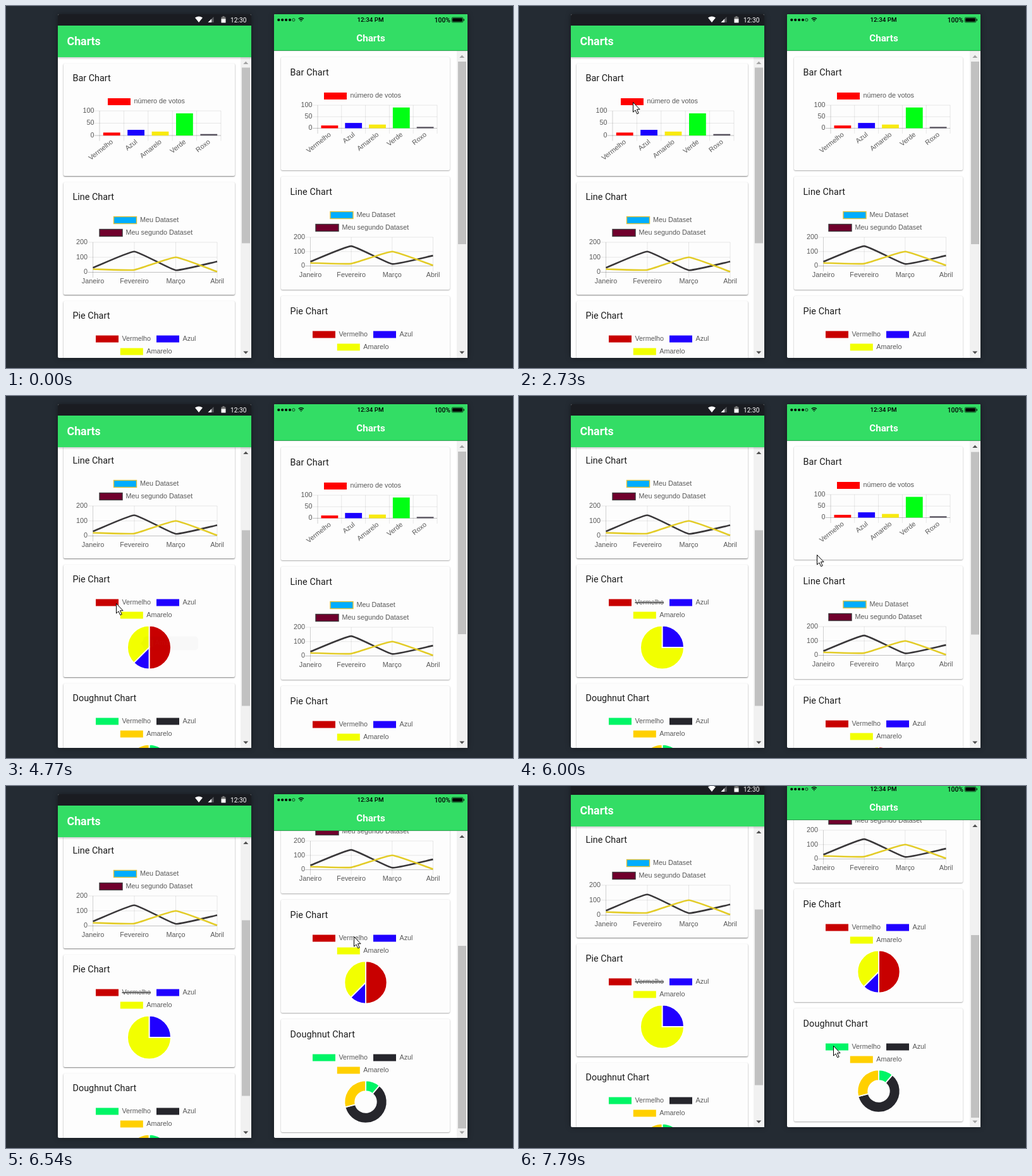
Write an HTML page with a canvas that moves like this. It is 802 px wide and 573 px high and loops after 8 s.

```html
<!DOCTYPE html>
<html lang="pt">
<head>
<meta charset="utf-8">
<title>Charts</title>
<style>
html, body { margin: 0; width: 100%; height: 100%; overflow: hidden; background: #242b33; }
canvas { display: block; }
</style>
</head>
<body>
<canvas id="stage" width="802" height="573"></canvas>
<script>
const g = document.getElementById('stage').getContext('2d');
const SANS = '"Liberation Sans", Arial, sans-serif', ROBOTO = 'Roboto, sans-serif';
const TAU = Math.PI * 2, LOOP = 8000;
const clamp = v => Math.max(0, Math.min(1, v));
const lerp = (a, b, u) => a + (b - a) * u;

// Number of steps (0..n) taken of a move that shows its first step at t0 and its last at t1.
const steps = (t, t0, t1, n) =>
  t < t0 ? 0 : Math.min(n, Math.floor((t - t0) / (t1 - t0 || 1) * (n - 1) + 0.25) + 1);

// Layout; chart positions are relative to the card's corner.
const android = {
  x: 82, top: 81, card: [91, 91, 271, 178], pitch: 188, spacing: '0px', titleY: 28, row: 60,
  thumb: [97.5, 278, 0.575], maxScroll: 300, shadow: [2, 1, 0.5],
  bar: { key: 70, x0: 57, x1: 249, y0: 75, y1: 114 },
  line: { keys: [79.5, 57], x0: 46.5, x1: 243, y0: 95, y1: 142.5 },
  pie: { keys: 51, cx: 135.5, r: 34.4 }
};
const ios = {
  x: 424, top: 71, card: [435, 81, 267, 179], pitch: 189, spacing: '0.12px', titleY: 29, row: 61,
  thumb: [88, 289, 0.5914], maxScroll: 279, shadow: [2, 0.8, 0.4],
  bar: { key: 68, x0: 58, x1: 247, y0: 76, y1: 112.5 },
  line: { keys: [78, 55], x0: 46.5, x1: 240.5, y0: 96, y1: 141.5 },
  pie: { keys: 50, cx: 134, r: 33.6 }
};

// Pointer moves: first step, last step, step count, waypoints.
const moves = [
  [950, 1490, 8, [171, 151]],
  [1890, 1950, 2, [176, 151]],
  [2120, 2120, 1, [180, 152]],
  [2807, 3190, 6, [203, 219]],
  [3350, 3350, 1, [198, 228]],
  [4240, 4930, 10, [203, 310], [206, 404], [154, 352], [174, 328], [163, 328]],
  [5300, 5860, 8, [471, 251]],
  [6080, 6300, 4, [550, 238]],
  [6620, 6700, 2, [563, 134]],
  [6770, 6770, 1, [567, 143]],
  [6930, 7720, 11, [497, 408]],
  [7790, 7790, 1, [497, 411]]
];

function pointerAt(t) {
  let at = [20, 129];
  for (const [t0, t1, n, ...pts] of moves) {
    const done = steps(t, t0, t1, n) / n;
    if (!done) break;
    const path = [at, ...pts], u = done * pts.length;
    const i = Math.min(Math.floor(u), pts.length - 1);
    at = [0, 1].map(k => lerp(path[i][k], path[i + 1][k], u - i));
    if (done < 1) break;
  }
  return at;
}

function stateAt(t) {
  const v = clamp((76 * steps(t, 5940, 6700, 11) - 100) / 540);
  const tip = steps(t, 4240, 4930, 10);
  return {
    hidden: t >= 1890 && t < 2730,
    barSize: t >= 1950 ? 0 : 0.4,
    scroll: 200 * steps(t, 3670, 4070, 6) / 6,
    iosScroll: 279 * (v < 0.5 ? 4 * v ** 3 : 1 - 4 * (1 - v) ** 3),
    tip: clamp(Math.min((tip - 2) / 2, (8.05 - tip) / 2)),
    struck: t >= 5090,
    pie: 1 - (1 - steps(t, 5090, 5860, 11) / 11) ** 4,
    page: 17 * steps(t, 6930, 7080, 3) / 3
  };
}

function rect(x, y, w, h, color) {
  g.fillStyle = color;
  g.fillRect(x, y, w, h);
}

function poly(color, ...pts) {
  g.beginPath();
  pts.forEach(p => g.lineTo(...p));
  g.closePath();
  g.fillStyle = color;
  g.fill();
}

function round(x, y, w, h, r, color) {
  g.beginPath();
  g.roundRect(x, y, w, h, r);
  g.fillStyle = color;
  g.fill();
}

function text(s, x, y, { font = `10.8px ${SANS}`, color = '#585858', align = 'left', base = 'middle' } = {}) {
  g.font = font;
  g.fillStyle = color;
  g.textAlign = align;
  g.textBaseline = base;
  g.fillText(s, x, y);
}

function rule(x0, y0, x1, y1, color = 'rgba(0,0,0,.1)', width = 0.9) {
  g.beginPath();
  g.moveTo(x0, y0);
  g.lineTo(x1, y1);
  g.strokeStyle = color;
  g.lineWidth = width;
  g.stroke();
}

function legend(x, y, label, color, { border, struck } = {}) {
  rect(x, y - 5.5, 36, 11, color);
  if (border) {
    g.strokeStyle = border;
    g.lineWidth = 1.4;
    g.strokeRect(x, y - 5.5, 36, 11);
  }
  text(label, x + 41.5, y);
  if (struck) rule(x + 41.5, y, x + 41.5 + g.measureText(label).width, y, '#666', 1.8);
}

function grid({ x0, x1, y0, y1 }, columns, labels) {
  labels.forEach((label, i) => {
    const y = lerp(y0, y1, i / 2);
    rule(x0 - 8, y, x1, y, i == 2 ? 'rgba(0,0,0,.27)' : undefined);
    text(label, x0 - 8.5, y, { align: 'right' });
  });
  for (let i = 0; i <= columns; i++) {
    const x = lerp(x0, x1, i / columns);
    rule(x, y0, x, y1 + 8.5, i ? undefined : 'rgba(0,0,0,.2)');
  }
}

function barChart(p, s) {
  const b = p.bar, off = p == android && s.hidden;
  legend(b.key, p.row + 0.5, 'número de votos', '#f00', { struck: off });
  grid(b, 5, off ? ['1.0', '0.5', '0'] : ['100', '50', '0']);
  const w = (b.x1 - b.x0) / 5;
  [['Vermelho', 12, '#f00'], ['Azul', 23, '#1a00ff'], ['Amarelo', 16, '#f8ea10'],
   ['Verde', 90, '#00ff14'], ['Roxo', 6, '#55505c']].forEach(([name, value, color], i) => {
    const x = b.x0 + w * (i + 0.5), h = value / 100 * (b.y1 - b.y0) * (off ? s.barSize : 1);
    rect(x - 13.4, b.y1 - h, 26.8, h, color);
    g.save();
    g.translate(x + 1, b.y1 + 9);
    g.rotate(-0.665);
    text(name, 0, 0, { align: 'right' });
    g.restore();
  });
}

function spline(pts, color, tension = 0.12) {
  const ctrl = pts.map((q, i) => {
    const a = pts[i - 1] || q, b = pts[i + 1] || q;
    const da = Math.hypot(q[0] - a[0], q[1] - a[1]), db = Math.hypot(b[0] - q[0], b[1] - q[1]);
    const at = f => [q[0] + f * (b[0] - a[0]), q[1] + f * (b[1] - a[1])];
    return [at(-tension * da / (da + db)), at(tension * db / (da + db))];
  });
  g.beginPath();
  g.moveTo(...pts[0]);
  for (let i = 1; i < pts.length; i++) g.bezierCurveTo(...ctrl[i - 1][1], ...ctrl[i][0], ...pts[i]);
  g.strokeStyle = color;
  g.lineWidth = 2.6;
  g.stroke();
}

function lineChart(p) {
  const l = p.line;
  legend(l.keys[0], p.row, 'Meu Dataset', '#00adff', { border: '#dcc03c' });
  legend(l.keys[1], p.row + 20, 'Meu segundo Dataset', '#70002c', { border: '#3c3338' });
  grid(l, 3, ['200', '100', '0']);
  const x = i => lerp(l.x0, l.x1, i / 3);
  ['Janeiro', 'Fevereiro', 'Março', 'Abril'].forEach((m, i) =>
    text(m, x(i), l.y1 + 15, { align: 'center' }));
  const plot = (data, color) => spline(data.map((v, i) => [x(i), lerp(l.y1, l.y0, v / 200)]), color);
  plot([30, 138, 14, 72], '#3a383a');
  plot([21, 16, 100, 4], '#e3cc28');
}

function slices(p, cuts, colors, hole) {
  const { cx, r } = p.pie;
  colors.forEach((color, i) => {
    if (cuts[i + 1] - cuts[i] < 0.002) return;
    const a = cuts[i] * TAU - TAU / 4, b = cuts[i + 1] * TAU - TAU / 4;
    g.beginPath();
    g.arc(cx, 131, r, a, b);
    if (hole) g.arc(cx, 131, hole, b, a, true);
    else g.lineTo(cx, 131);
    g.closePath();
    g.fillStyle = color;
    g.fill();
    g.strokeStyle = '#fff';
    g.lineWidth = 1.8;
    g.stroke();
  });
}

function roundLegend(p, colors, struck) {
  const x = p.pie.keys;
  legend(x, p.row, 'Vermelho', colors[0], { struck });
  legend(x + 96, p.row, 'Azul', colors[1]);
  legend(x + 38.8, p.row + 20, 'Amarelo', colors[2]);
}

function pieChart(p, s) {
  const colors = ['#c80000', '#2000ff', '#f2ff00'], own = p == android, u = own ? s.pie : 0;
  roundLegend(p, colors, own && s.struck);
  slices(p, [0, lerp(0.5, 0, u), lerp(0.625, 0.25, u), 1], colors);
  if (!own || !s.tip) return;
  g.save();
  g.globalAlpha = s.tip;
  g.translate(p.pie.cx - 9.5, 113.5);
  round(0, 0, 87, 22, 5, 'rgba(0,0,0,.8)');
  poly('rgba(0,0,0,.8)', [0, 6.5], [-4.5, 11], [0, 15.5]);
  rect(5.5, 5.5, 10.8, 10.8, colors[2]);
  text('Amarelo: 30', 18.5, 11, { color: '#fff' });
  g.restore();
}

function doughnutChart(p) {
  const colors = ['#00f566', '#26262c', '#ffd000'];
  roundLegend(p, colors);
  slices(p, [0, 0.112, 0.71, 1], colors, p.pie.r / 2);
}

const charts = [['Bar', barChart], ['Line', lineChart], ['Pie', pieChart], ['Doughnut', doughnutChart]];

function arrow(x, y, dir, off) {
  poly(off ? '#a3a3a3' : '#505050', [x - 4, y + 2 * dir], [x + 4, y + 2 * dir], [x, y - 2.3 * dir]);
}

function screen(p, s, scroll) {
  g.save();
  g.shadowColor = 'rgba(0,0,0,.4)';
  g.shadowBlur = 8;
  round(p.x, 13, 306, 544, 2, '#fff');
  g.restore();

  g.save();
  g.beginPath();
  g.rect(p.x, p.top, 306, 557 - p.top);
  g.clip();
  const [x, y, w, h] = p.card;
  charts.forEach(([name, draw], i) => {
    g.save();
    g.translate(x, y + i * p.pitch - scroll);
    g.save();
    g.shadowBlur = p.shadow[0];
    g.shadowOffsetY = p.shadow[1];
    g.shadowColor = `rgba(0,0,0,${p.shadow[2]})`;
    round(0, 0, w, h, 2, '#fdfdfd');
    g.restore();
    g.letterSpacing = p.spacing;
    text(name + ' Chart', 14.5, p.titleY, { font: `14.4px ${ROBOTO}`, color: '#1c1c1c', base: 'alphabetic' });
    g.letterSpacing = '0px';
    draw(p, s);
    g.restore();
  });
  const bar = p.x + 289;
  rect(bar, p.top, 17, 557 - p.top, '#f1f1f1');
  rect(bar + 2, p.thumb[0] + p.thumb[2] * scroll, 13, p.thumb[1], '#c1c1c1');
  arrow(bar + 8.3, p.top + 9, 1, scroll < 0.5);
  arrow(bar + 8.3, 548.5, -1, scroll > p.maxScroll - 0.5);
  g.restore();
}

function androidTop() {
  for (let i = 0; i < 4; i++) rect(82, 81 + i, 306, 1, `rgba(0,0,0,${0.16 - i * 0.045})`);
  round(82, 13, 306, 18, [2, 2, 0, 0], '#1a1c21');
  rect(82, 31, 306, 50, '#33dd65');
  text('Charts', 96.5, 62, { font: `700 17.8px ${ROBOTO}`, color: '#fff', base: 'alphabetic' });
  const white = { font: `10.2px ${ROBOTO}`, color: '#fff', base: 'alphabetic' };
  text('12:30', 355, 25.5, white);
  poly('#fff', [299, 18.5], [302, 17], [305, 16.5], [308, 17], [311, 18.5], [305, 26]);
  poly('#5a5c60', [328.5, 17], [328.5, 26], [319.5, 26]);
  poly('#fff', [325, 20.5], [325, 26], [319.5, 26]);
  rect(342.5, 16, 3, 2, '#777');
  rect(340.5, 17.5, 7, 4, '#777');
  rect(340.5, 20.5, 7, 6, '#fff');
}

function iosTop() {
  round(424, 13, 306, 58, [2, 2, 0, 0], '#33dd65');
  rect(424, 70.3, 306, 0.9, 'rgba(0,0,0,.35)');
  text('Charts', 577, 56, { font: `700 15.2px ${ROBOTO}`, color: '#fff', align: 'center', base: 'alphabetic' });
  const black = { font: `500 9.8px ${ROBOTO}`, color: '#000', base: 'alphabetic' };
  text('12:34 PM', 576.5, 25.3, { ...black, align: 'center' });
  text('100%', 703, 25.5, { ...black, font: `500 10.4px ${ROBOTO}`, align: 'right' });
  g.strokeStyle = g.fillStyle = '#000';
  g.lineWidth = 0.7;
  for (let i = 0; i < 5; i++) {
    g.beginPath();
    g.arc(431.3 + i * 5.9, 22, 2.1, 0, TAU);
    i < 4 ? g.fill() : g.stroke();
  }
  g.lineWidth = 1.4;
  [1, 3.6, 6.2].forEach(r => {
    g.beginPath();
    g.arc(466.8, 25, r, -TAU * 0.365, -TAU * 0.135);
    g.stroke();
  });
  g.lineWidth = 0.7;
  g.beginPath();
  g.roundRect(705.3, 18.2, 17.6, 7.6, 1.5);
  g.stroke();
  round(706.3, 19.2, 15.6, 5.6, 0.8, '#000');
  rect(723.7, 20.5, 1.2, 3, '#000');
}

function pointer(x, y) {
  g.save();
  g.translate(x + 0.5, y + 0.5);
  poly('#fff', [0, 0], [0, 15.5], [3.5, 12.3], [6.2, 18.2], [8.7, 17.2], [6, 11.2], [10.6, 11.2]);
  g.strokeStyle = '#000';
  g.lineWidth = 1;
  g.stroke();
  g.restore();
}

function draw(now) {
  const t = now % LOOP, s = stateAt(t);
  rect(0, 0, 802, 573, '#242b33');
  g.save();
  g.translate(0, -s.page);
  screen(android, s, s.scroll);
  androidTop();
  screen(ios, s, s.iosScroll);
  iosTop();
  g.restore();
  if (t >= 950) pointer(...pointerAt(t).map(Math.round));
}

const start = performance.now();
function tick() {
  draw(performance.now() - start);
  requestAnimationFrame(tick);
}
tick();
</script>
</body>
</html>
```
